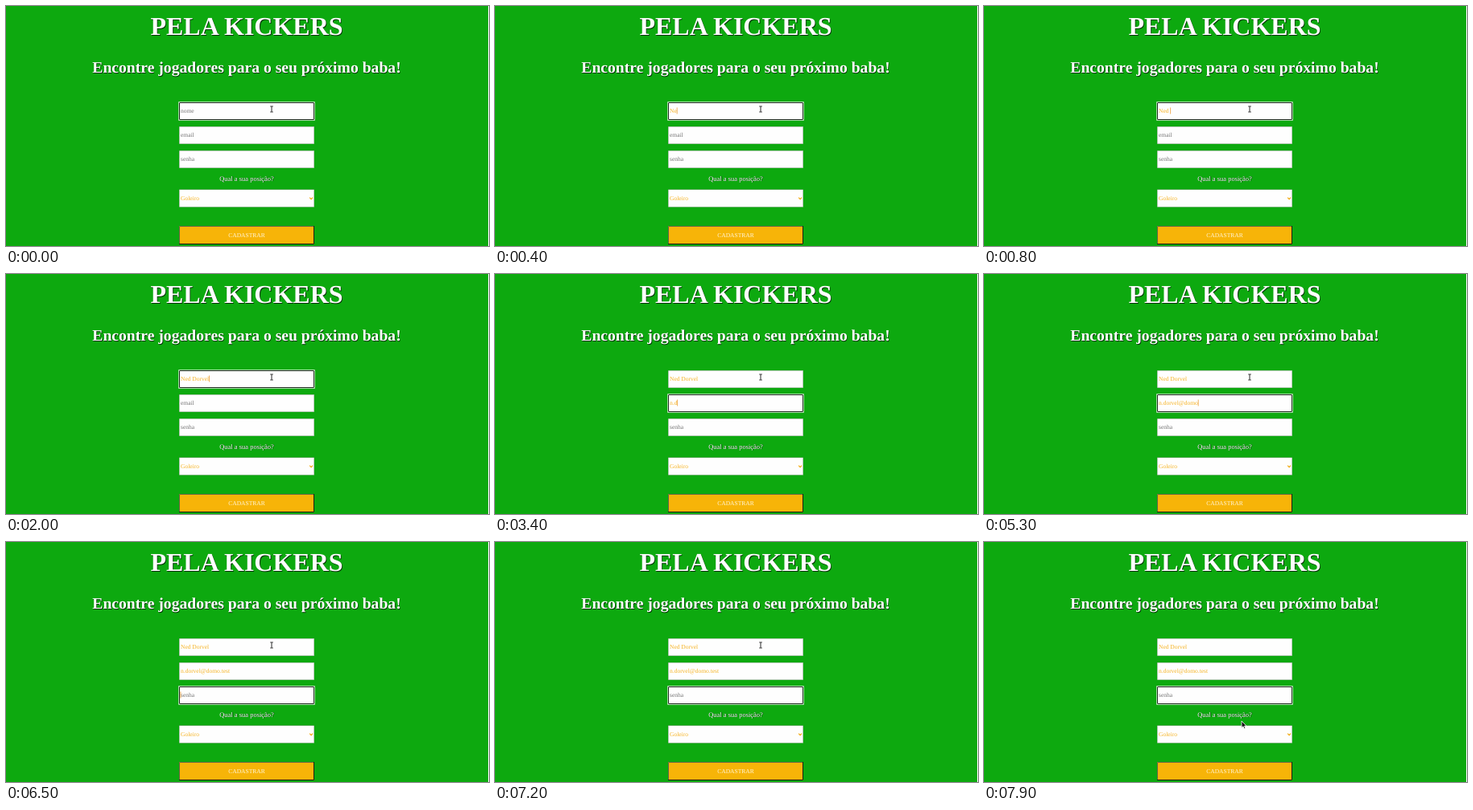
An HTML page that plays this animation: 600x299 px, repeating every 8000 ms.

```html
<!DOCTYPE html>
<html lang="pt-BR">
<head>
<meta charset="utf-8">
<title>Cadastro</title>
<style>
  html, body { margin: 0; width: 100%; height: 100%; overflow: hidden; background: #0da90f; }
  svg { display: block; }
  text {
    font-family: "Liberation Serif", "Times New Roman", serif;
    font-size: 7.5px;
    text-rendering: geometricPrecision;
  }
  .mid { text-anchor: middle; fill: #fff; }
  .head { font-weight: bold; }
  .hint { fill: #757575; }
  .typed { fill: #f5b324; }
  .box { fill: #fefefe; stroke: #777; stroke-width: .4; stroke-opacity: .7; }
</style>
</head>
<body>
<svg id="stage" width="600" height="299" viewBox="0 0 600 299"></svg>
<script>
const LOOP = 8000;
const BLINK = 500;
const LEFT = 217;
const stage = document.getElementById('stage');

const fields = [
  { y: 120, hint: 'nome', value: 'Ned Dorvel', focus: 0,
    keys: [200, 400, 600, 800, 1000, 1200, 1400, 1500, 1700, 1900] },
  { y: 150, hint: 'email', value: 'n.dorvel@domo.test', focus: 2700,
    keys: [2900, 3100, 3300, 3600, 3700, 3900, 4000, 4200, 4600,
           4800, 5100, 5200, 5300, 5500, 5700, 5900, 6100, 6200] },
  { y: 180, hint: 'senha', value: '', focus: 6400, keys: [] }
];

function add(tag, attrs, content = '', parent = stage) {
  const el = document.createElementNS('http://www.w3.org/2000/svg', tag);
  for (const name in attrs) el.setAttribute(name, attrs[name]);
  el.textContent = content;
  return parent.appendChild(el);
}

function shadowed(content, y, size, shift, cls) {
  const style = `font-size:${size}px`;
  add('text', { x: 299 + shift, y: y + shift, class: cls, style: style + ';fill:#08300a' }, content);
  add('text', { x: 299, y, class: cls, style }, content);
}

function box(y, height) {
  add('rect', { x: 215.2, y: y + .2, width: 167.6, height: height - .4, class: 'box' });
}

shadowed('PELA KICKERS', 36, 32, .8, 'mid head');
shadowed('Encontre jogadores para o seu próximo baba!', 83, 19.65, .6, 'mid head');
shadowed('Qual a sua posição?', 217.6, 8.5, .6, 'mid');

for (const f of fields) {
  box(f.y, 22);
  f.ring = add('g', {});
  add('rect', { x: 214, y: f.y - 1, width: 170, height: 24, rx: 1,
    fill: '#fff', 'fill-opacity': .65 }, '', f.ring);
  add('rect', { x: 215.5, y: f.y + .5, width: 167, height: 21, rx: .5,
    fill: '#fefefe', stroke: '#1c2a1c' }, '', f.ring);
  f.text = add('text', { x: LEFT, y: f.y + 13.2 });
  f.text.setAttributeNS('http://www.w3.org/XML/1998/namespace', 'xml:space', 'preserve');
}

// Select
box(228.6, 22);
add('text', { x: LEFT, y: 242.2, class: 'typed' }, 'Goleiro');
add('path', { d: 'M377.2 238.7l1.9 1.9 1.9-1.9', fill: 'none', stroke: '#f0a400', 'stroke-width': 1.1 });

// Button with a raised edge
add('rect', { x: 215, y: 274, width: 168, height: 23, fill: '#f7b408' });
add('path', { d: 'M215.5 297V274.5H383', fill: 'none', stroke: '#6c6545' });
add('path', { d: 'M215 296.5H382.5V274', fill: 'none', stroke: '#1d1d12' });
add('text', { x: 299, y: 288, class: 'mid', style: 'fill:#fff6dc' }, 'CADASTRAR');

// White strip at the right edge
add('rect', { x: 599, y: 0, width: 1, height: 299, fill: '#fff' });

const caret = add('rect', { width: .7, height: 8, fill: '#e98f1c' });

const beam = add('g', { fill: 'none' });
const beamPath = 'M-1.8-3.5H1.8M0-3.5V3.5M-1.8 3.5H1.8';
add('path', { d: beamPath, stroke: '#fff', 'stroke-width': 2 }, '', beam);
add('path', { d: beamPath, stroke: '#3a3a3a', 'stroke-width': 1.1 }, '', beam);

const arrow = add('path', {
  d: 'M0 0V8.4L2 6.7 3.3 9.6 4.7 9 3.5 6.2H6Z',
  fill: '#111', stroke: '#fff', 'stroke-width': .8
});

const show = (el, on) => el.setAttribute('visibility', on ? 'visible' : 'hidden');

function drawFields(t) {
  const active = fields.filter(f => t >= f.focus).pop();
  for (const f of fields) {
    const count = f.keys.filter(k => k <= t).length;
    f.text.textContent = count ? f.value.slice(0, count) : f.hint;
    f.text.setAttribute('class', count ? 'typed' : 'hint');
    show(f.ring, f === active);
    if (f !== active) continue;

    // The blink restarts with every key
    const since = t - (count ? f.keys[count - 1] : f.focus);
    const idle = f.focus === 0 && count === 0;
    show(caret, !idle && since % (2 * BLINK) < BLINK);
    caret.setAttribute('x', LEFT + (count ? f.text.getComputedTextLength() : -.4));
    caret.setAttribute('y', f.y + 6.5);
  }
}

function drawPointer(t) {
  const p = Math.min(1, Math.max(0, (t - 7400) / 500));
  const ease = p * p * (3 - 2 * p);
  const x = 330 - 10 * ease;
  const y = 128.5 + 94.5 * ease;
  const overText = fields.some(f => y >= f.y && y <= f.y + 22) || (y > 210 && y < 220);
  show(beam, overText);
  show(arrow, !overText);
  for (const el of [beam, arrow]) el.setAttribute('transform', `translate(${x} ${y})`);
}

const start = performance.now();
function draw() {
  const t = Math.floor((performance.now() - start) % LOOP / 100) * 100;
  drawFields(t);
  drawPointer(t);
  requestAnimationFrame(draw);
}
draw();
</script>
</body>
</html>
```
